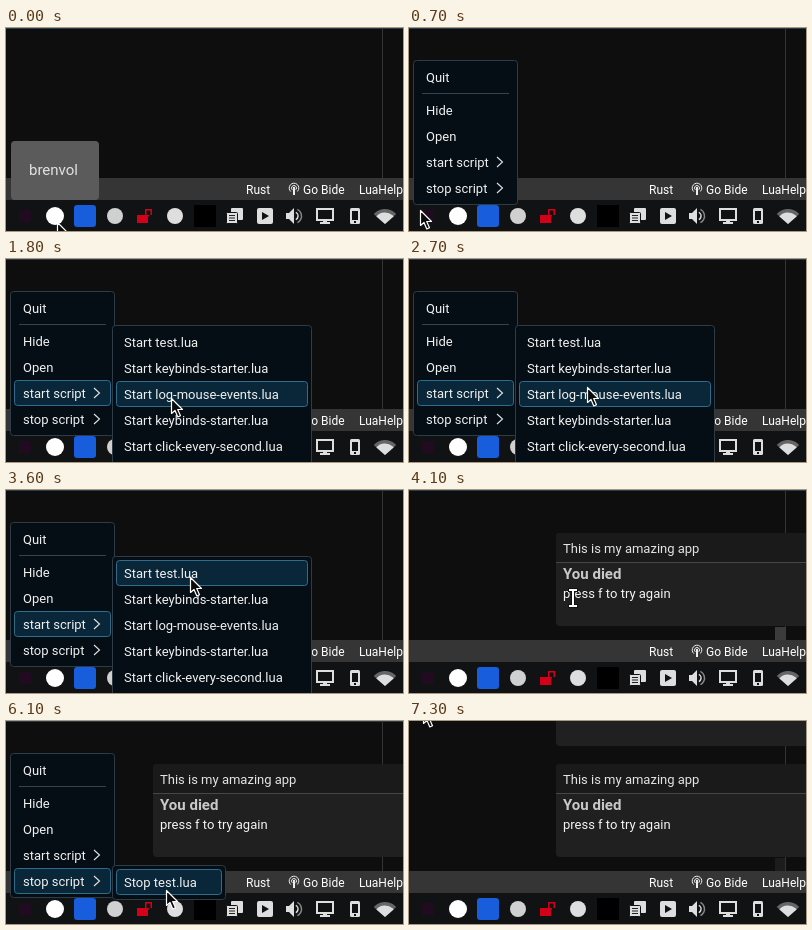
Write an HTML page with a canvas that moves like this. It is 397 by 203 pixels and loops after 7400 ms.

```html
<!DOCTYPE html>
<html lang="en">
<head>
<meta charset="utf-8">
<title>Tray menu demo</title>
<style>
  html, body { margin: 0; width: 100%; height: 100%; overflow: hidden; background: #0e0e0e; }
  canvas { display: block; width: 397px; height: 203px; }
</style>
</head>
<body>
<canvas id="stage" width="397" height="203"></canvas>
<script>
const ctx = document.getElementById('stage').getContext('2d');
const W = 397, H = 203, LOOP = 7400, STEP = 100;
const ICON = '#dedede', TRAY = '#111213';

// Pointer path: [step, x, y]
const PATH = [
  [0, 51, 194], [4, 4, 182], [6, 11, 182], [8, 11, 182], [11, 25, 146], [13, 27, 138],
  [14, 27, 138], [17, 140, 139], [18, 165, 139], [20, 174, 158], [22, 174, 158],
  [23, 175, 159], [24, 175, 159], [27, 178, 128], [30, 184, 88], [32, 184, 88],
  [33, 186, 82], [34, 184, 85], [35, 184, 85], [37, 183, 88], [39, 183, 88],
  [41, 164, 108], [44, 70, 168], [47, 18, 184], [49, 17, 183], [54, 40, 156],
  [55, 42, 157], [58, 130, 160], [60, 160, 175], [63, 160, 157], [69, 14, -12],
  [70, 14, -12], [71, 14, -13]
];

const MENU = ['Quit', 'Hide', 'Open', 'start script', 'stop script'];
const SCRIPTS = ['test', 'keybinds-starter', 'log-mouse-events', 'keybinds-starter', 'click-every-second'];

const within = (n, a, b) => n >= a && n < b;

function pointerAt(n) {
  let i = 0;
  while (i < PATH.length - 2 && PATH[i + 1][0] <= n) i++;
  const [a, ax, ay] = PATH[i], [b, bx, by] = PATH[i + 1];
  const k = Math.min(1, (n - a) / (b - a));
  return [Math.round(ax + (bx - ax) * k), Math.round(ay + (by - ay) * k)];
}

function rect(x, y, w, h, color) {
  ctx.fillStyle = color;
  ctx.fillRect(x, y, w, h);
}

function round(x, y, w, h, r, fill, stroke) {
  ctx.beginPath();
  ctx.roundRect(x, y, w, h, r);
  if (fill) { ctx.fillStyle = fill; ctx.fill(); }
  if (stroke) { ctx.strokeStyle = stroke; ctx.lineWidth = 1; ctx.stroke(); }
}

function poly(points, fill) {
  ctx.beginPath();
  points.forEach(([x, y]) => ctx.lineTo(x, y));
  ctx.closePath();
  ctx.fillStyle = fill;
  ctx.fill();
}

function disc(x, y, r, color) {
  ctx.beginPath();
  ctx.arc(x, y, r, 0, Math.PI * 2);
  ctx.fillStyle = color;
  ctx.fill();
}

function arc(x, y, r, a, b, color, width) {
  ctx.beginPath();
  ctx.arc(x, y, r, a, b);
  ctx.strokeStyle = color;
  ctx.lineWidth = width;
  ctx.stroke();
}

function text(str, x, y, size, color, weight = 400) {
  ctx.font = `${weight} ${size}px Roboto, sans-serif`;
  ctx.fillStyle = color;
  ctx.fillText(str, x, y);
}

function drawDesktop(n) {
  rect(0, 0, W, 150, '#0e0e0e');
  if (n < 73) rect(0, 0, W, 1, '#263c49');
  rect(376, 1, 1, 149, '#353535');
  if (within(n, 40, 46)) rect(366, 137, 11, 13, '#3b3b3b');
  if (n >= 73) rect(366, 137, 10, 13, '#1c1c1c');

  rect(0, 150, W, 22, '#353535');
  text('Rust', 240, 166, 12, '#fff');
  text('Go Bide', 297, 166, 12, '#fff');
  text('LuaHelp', 353, 166, 12, '#fff');
  for (const r of [4.8, 2.5]) arc(288, 160, r, Math.PI * 0.73, Math.PI * 2.27, '#eee', 1);
  disc(288, 160, 1.2, '#eee');
  rect(287, 161, 2, 6, '#eee');
}

function drawTray() {
  rect(0, 172, W, 31, TRAY);

  rect(13, 182, 12, 12, '#210b20');
  disc(49, 188, 9, '#fff');
  round(68, 177, 22, 22, 3, '#175ddc');
  disc(109, 188, 8, '#d0d0d0');
  disc(169, 188, 8, ICON);
  rect(188, 177, 22, 22, '#000');

  // Open padlock
  rect(131, 187, 11, 8, '#d4001a');
  ctx.strokeStyle = '#d4001a';
  ctx.lineWidth = 1.5;
  ctx.strokeRect(139.75, 181.75, 5.5, 6);
  rect(143, 187, 4, 2, TRAY);

  // Clipboard
  round(225, 180, 12, 12, 1, ICON);
  round(220.5, 184.5, 11, 11, 1, ICON, TRAY);
  for (let i = 0; i < 3; i++) rect(223, 187 + i * 2.5, 6, 1, '#222');

  // Player
  round(251, 180, 16, 16, 2, ICON);
  poly([[256, 184], [256, 192], [263, 188]], TRAY);

  // Speaker
  rect(280, 185, 4, 6, ICON);
  poly([[282, 186], [288, 180], [288, 196], [282, 190]], ICON);
  arc(288, 188, 4, -1.1, 1.1, ICON, 1.5);
  arc(288, 188, 7.5, -1.1, 1.1, '#888', 1.5);

  // Monitor
  ctx.strokeStyle = ICON;
  ctx.lineWidth = 2;
  ctx.strokeRect(311, 181, 16, 11);
  rect(317, 193, 4, 2, ICON);
  rect(314, 194, 10, 2, ICON);

  // Phone
  round(344, 180, 10, 16, 1.5, ICON);
  rect(346, 183, 6, 9, TRAY);
  rect(348, 193, 2, 2, TRAY);

  // Wireless signal
  const fan = (r, color) => {
    ctx.beginPath();
    ctx.moveTo(379, 196);
    ctx.arc(379, 196, r, -Math.PI * 0.77, -Math.PI * 0.23);
    ctx.fillStyle = color;
    ctx.fill();
  };
  fan(15, '#666');
  fan(11.5, ICON);
}

function drawNote(y) {
  round(147, y, 260, 93, 4, '#202020');
  round(147, y, 260, 29, [4, 4, 0, 0], '#1a1a1a');
  rect(147, y + 29, 250, 1, '#464646');
  text('This is my amazing app', 154, y + 20, 13, '#e4e4e4');
  text('You died', 154, y + 46, 15, '#c9c9c9', 700);
  text('press f to try again', 154, y + 65, 13, '#f4f4f4');
}

function panel(x, y, w, h) {
  round(x + .5, y + .5, w - 1, h - 1, 3, '#050e15', '#2d3c46');
}

function highlight(x, y, w) {
  round(x + .5, y + .5, w - 1, 25, 3, '#0a2739', '#306d8c');
}

function chevron(x, y) {
  ctx.beginPath();
  ctx.moveTo(x, y - 5);
  ctx.lineTo(x + 5.5, y);
  ctx.lineTo(x, y + 5);
  ctx.strokeStyle = '#e4e4e4';
  ctx.lineWidth = 1.1;
  ctx.stroke();
}

function drawMenu(active) {
  panel(4, 32, 105, 145);
  rect(13, 65, 87, 1, '#35444e');
  MENU.forEach((label, i) => {
    const y = i ? 61 + i * 26 : 54;
    if (i === active) highlight(8, y - 18, 97);
    text(label, 17, y, 13, '#f0f0f0');
    if (i > 2) chevron(88, y - 5);
  });
}

function drawSubmenu(labels, y, w, h, pointer) {
  const [px, py] = pointer;
  const active = px >= 110 ? Math.floor((py - y - 4) / 26) : -1;
  panel(106, y, w, h);
  labels.forEach((label, i) => {
    const top = y + 4 + i * 26;
    if (i === active) highlight(110, top, w - 8);
    text(label, 118, top + 18, 13, '#f0f0f0');
  });
}

function drawMenus(n, pointer) {
  if (within(n, 6, 40)) {
    drawMenu(n < 10 ? -1 : n < 11 ? 4 : 3);
    if (n >= 12) drawSubmenu(SCRIPTS.map(s => `Start ${s}.lua`), 66, 200, 145, pointer);
  }
  if (within(n, 49, 63)) {
    drawMenu(n < 52 ? -1 : 4);
    if (n >= 55) drawSubmenu(['Stop test.lua'], 144, 114, 35, pointer);
  }
}

function drawArrow(x, y) {
  ctx.save();
  ctx.translate(x + .5, y + .5);
  ctx.lineJoin = 'round';
  ctx.lineWidth = 1.2;
  ctx.strokeStyle = '#fff';
  poly([[0, 0], [0, 15], [3.5, 12], [6.3, 18.5], [9, 17.3], [6.2, 11], [11, 11]], '#0a0a0a');
  ctx.stroke();
  ctx.restore();
}

function drawBeam(x, y) {
  const bars = (pad, color) => {
    const bar = (dx, dy, w, h) => rect(x + dx - pad, y + dy - pad, w + pad * 2, h + pad * 2, color);
    bar(-4, -9, 8, 2);
    bar(-1, -8, 2, 16);
    bar(-4, 7, 8, 2);
  };
  bars(1, '#111');
  bars(0, '#fff');
}

function draw(now) {
  const n = Math.floor((now % LOOP) / STEP);
  const pointer = pointerAt(n);
  drawDesktop(n);
  drawTray();
  if (n < 3) {
    round(5, 113, 88, 59, 4, '#5b5b5b');
    text('brenvol', 23, 147, 15, '#e2e2e2');
  }
  if (n >= 40) drawNote(43);
  if (n >= 64) drawNote(-68);
  drawMenus(n, pointer);
  if (n === 41) drawBeam(...pointer); else drawArrow(...pointer);
}

const start = performance.now();
function tick() {
  draw(performance.now() - start);
  requestAnimationFrame(tick);
}
tick();
</script>
</body>
</html>
```
